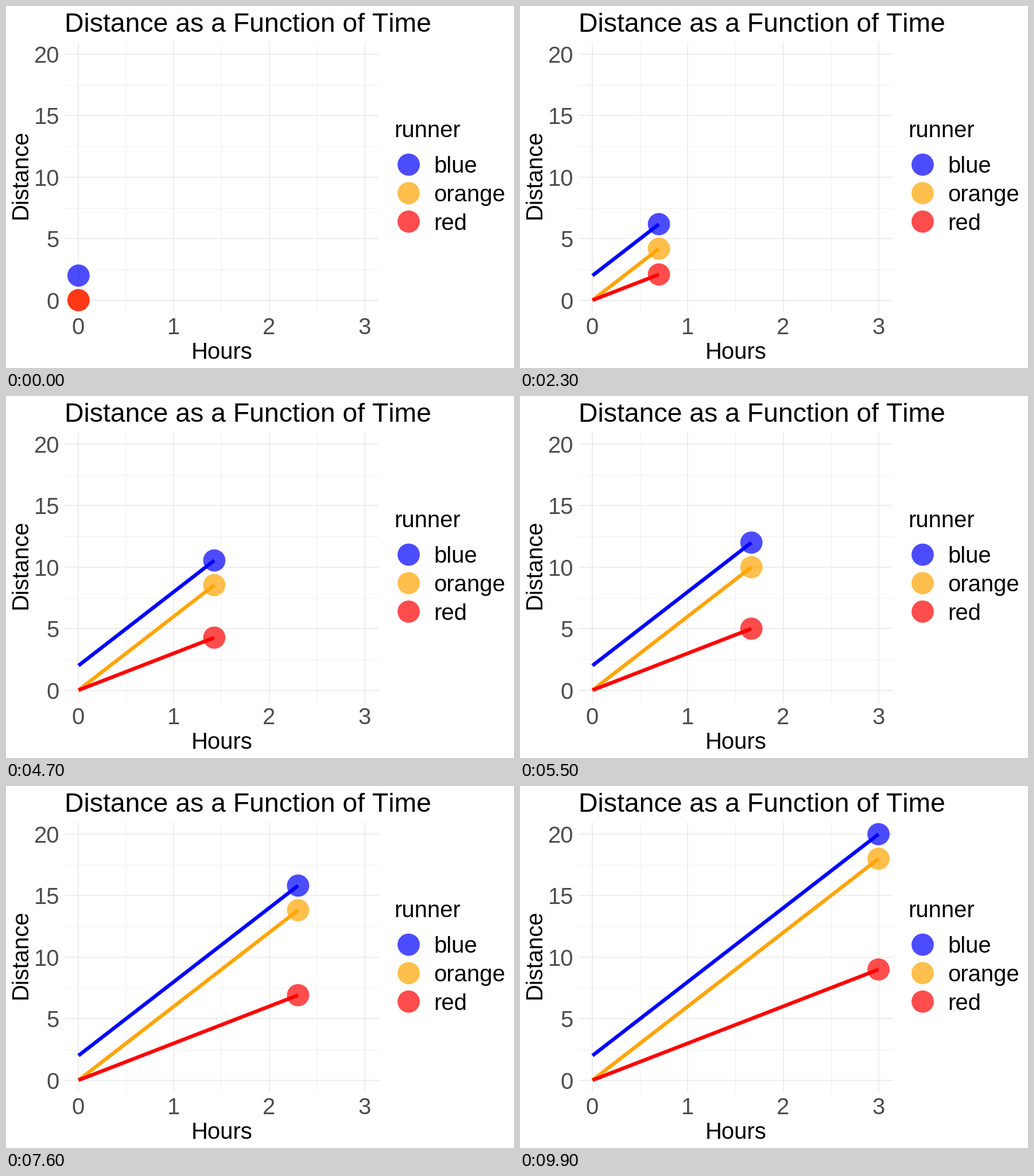
A matplotlib script that plays this animation: 885x632 px, repeating every 10 s.

```python
import matplotlib.pyplot as plt
from matplotlib.animation import FuncAnimation
from matplotlib.patches import Circle

W, H, DPI = 885, 632, 100
FRAMES, INTERVAL = 100, 100
PX = 72 / DPI  # one pixel in points

plt.rcParams.update({
    "font.family": "Liberation Sans",
    "text.hinting": "native",
    "text.hinting_factor": 8,
    "text.kerning_factor": 6,
})

# name, start distance, speed
RUNNERS = [("blue", 2, 6), ("orange", 0, 6), ("red", 0, 3)]
LEFT, RIGHT, TOP, BOTTOM = 102, 650, 63, 535
GRID, TICK = "#ebebeb", "#4d4d4d"
RADIUS = 19.4

fig = plt.figure(figsize=(W / DPI, H / DPI), dpi=DPI, facecolor="white")
ax = fig.add_axes([0, 0, 1, 1])
ax.set_xlim(0, W)
ax.set_ylim(H, 0)
ax.axis("off")


def px(hours):
    return 126.3 + 166.1 * hours


def py(distance):
    return 513.6 - 21.475 * distance


def label(x, y, text, size=40, color="black", ha="left", **kw):
    ax.text(x, y, text, fontsize=size * PX, color=color, ha=ha,
            va="baseline", **kw)


def grid_line(xs, ys, width):
    ax.plot(xs, ys, color=GRID, lw=width * PX, zorder=1,
            solid_capstyle="butt")


def dot(x, y, color, z):
    return ax.add_patch(Circle((x, y), RADIUS, facecolor=color, alpha=0.7,
                               lw=0, zorder=z))


for h in (0.5, 1.5, 2.5):
    grid_line([px(h)] * 2, [TOP, BOTTOM], 0.8)
for d in (2.5, 7.5, 12.5, 17.5):
    grid_line([LEFT, RIGHT], [py(d)] * 2, 0.8)
for h in range(4):
    grid_line([px(h)] * 2, [TOP, BOTTOM], 1.6)
    label(px(h) - 0.5, 573, str(h), color=TICK, ha="center")
for d in range(0, 21, 5):
    grid_line([LEFT, RIGHT], [py(d)] * 2, 1.6)
    label(93, py(d) + 15, str(d), color=TICK, ha="right")

label(102, 45, "Distance as a Function of Time", size=46.4)
label(376, 616, "Hours", ha="center")
label(37, 372, "Distance", rotation=90, rotation_mode="anchor")
label(676, 229, "runner")

dots, lines = [], []
for k, (name, start, speed) in enumerate(RUNNERS):
    dot(701.5, 277 + 49.7 * k, name, 2)
    label(745, 291 + 50 * k, name)
    dots.append(dot(px(0), py(start), name, 3 + k))
    lines += ax.plot([], [], color=name, lw=6.4 * PX, zorder=10 + k,
                     solid_capstyle="butt")


def draw(i):
    t = 3 * i / (FRAMES - 1)
    for (_, start, speed), c, line in zip(RUNNERS, dots, lines):
        x, y = px(t), py(start + speed * t)
        c.center = x, y
        line.set_data([px(0), x] if i else [], [py(start), y] if i else [])
    return dots + lines


anim = FuncAnimation(fig, draw, frames=FRAMES, interval=INTERVAL,
                     repeat=True, repeat_delay=0, blit=False)
plt.show()
```
